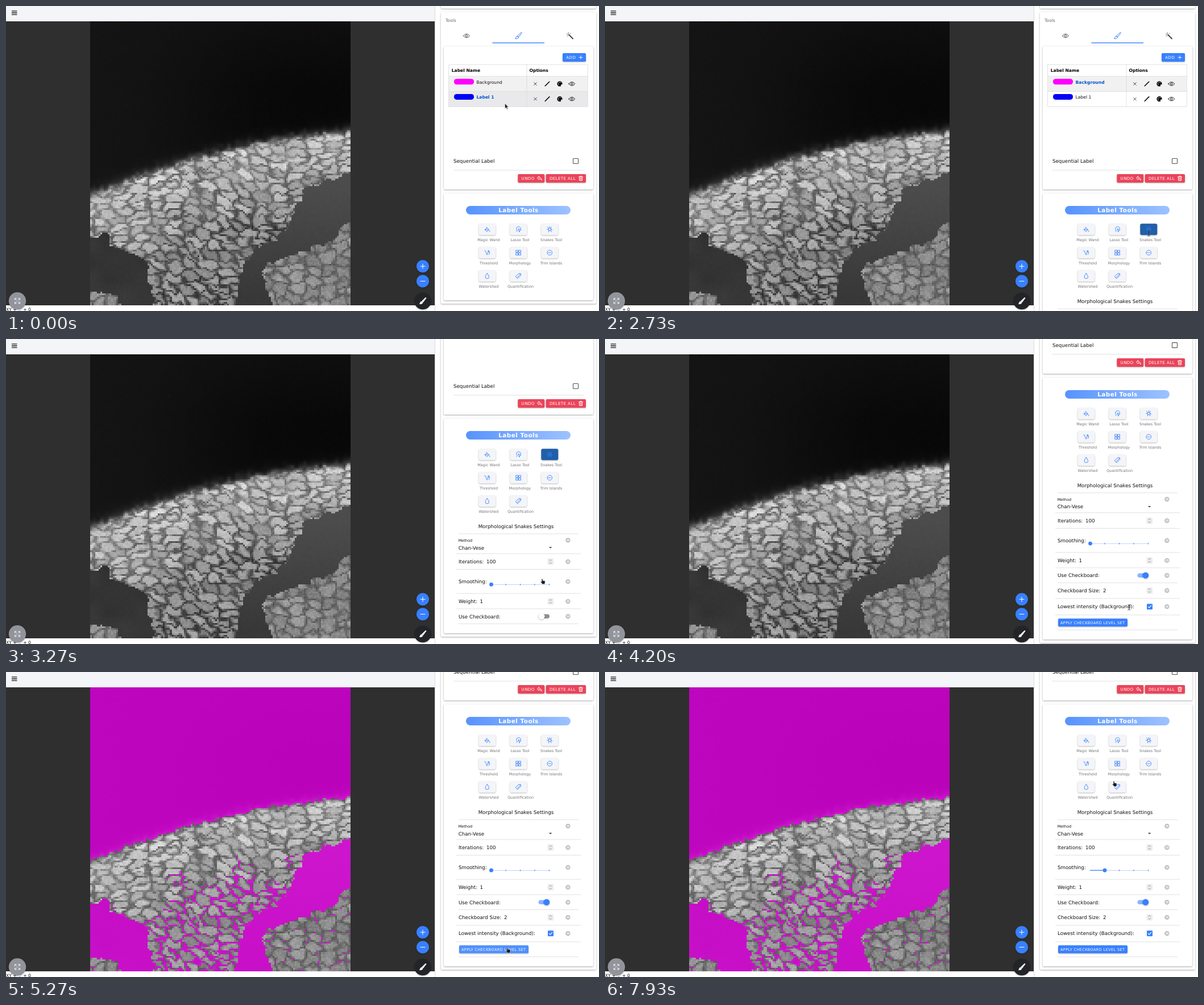
Animation of 1043 by 537 pixels, one loop 8000 ms. Source, as an HTML page with a canvas:

```html
<!DOCTYPE html>
<html lang="en">
<head>
<meta charset="utf-8">
<title>Label tools</title>
<style>
  html, body { margin: 0; width: 100%; height: 100%; overflow: hidden; background: #fff; }
  canvas { position: absolute; left: 147.5px; top: 27px; width: 458.5px; height: 500px; image-rendering: pixelated; }
  svg { position: absolute; left: 0; top: 0; }
  text { font-family: "DejaVu Sans", sans-serif; text-rendering: geometricPrecision; white-space: pre; }
  .card { filter: drop-shadow(0 1px 1.5px #0005); }
  .lift { filter: drop-shadow(0 1px 1px #0004); }
  .line { fill: none; stroke-linecap: round; stroke-linejoin: round; }
</style>
</head>
<body>
<svg id="back" width="1043" height="537"></svg>
<canvas id="scan" width="150" height="164"></canvas>
<canvas id="masked" width="150" height="164"></canvas>
<svg id="front" width="1043" height="537">
  <defs>
    <linearGradient id="pill"><stop stop-color="#5793fd"/><stop offset="1" stop-color="#9dc2ff"/></linearGradient>
    <clipPath id="side"><rect x="755" width="288" height="537"/></clipPath>
  </defs>
  <g id="viewer"></g>
  <g clip-path="url(#side)"><g id="panel"></g></g>
  <g id="cursor"></g>
</svg>
<script>
const $ = id => document.getElementById(id);
const BLUE = '#3880ff', RED = '#eb445a';
const clamp = (v, a = 0, b = 1) => Math.min(b, Math.max(a, v));
const mix = (a, b, k) => a + (b - a) * k;
const smooth = k => k * k * (3 - 2 * k);

// ---------- scan image ----------
const hash = (x, y) => {
  const h = Math.sin(x * 127.1 + y * 311.7) * 43758.5453;
  return h - Math.floor(h);
};
function noise(x, y) {
  const i = Math.floor(x), j = Math.floor(y), u = smooth(x - i), v = smooth(y - j);
  return mix(mix(hash(i, j), hash(i + 1, j), u), mix(hash(i, j + 1), hash(i + 1, j + 1), u), v);
}
// Distance to the nearest cell border and a random tone for that cell.
function cells(x, y) {
  let near = 9, next = 9, tone = 0;
  const ci = Math.floor(x), cj = Math.floor(y);
  for (let i = ci - 1; i <= ci + 1; i++) for (let j = cj - 1; j <= cj + 1; j++) {
    const d = Math.hypot(i + .1 + .8 * hash(i, j) - x, j + .1 + .8 * hash(j + 57, i) - y);
    if (d < near) { next = near; near = d; tone = hash(i + 91, j + 13); }
    else if (d < next) next = d;
  }
  return [smooth(clamp((next - near) * 2.6)), tone];
}
const region = d => new Path2D(d);
const lumen = region('M620 290L606 295L570 306L526 321L514 348L500 382L488 402L458 422L436 432L412 470L402 540L472 540L462 505L448 470L462 452L505 438L548 424L575 412L590 388L620 370Z');
const cavity = region('M140 408L176 402L184 428L216 432L242 445L252 475L256 505L262 540L212 540L192 510L168 500L140 506Z');
const lump = region('M450 468L462 452L505 438L548 424L575 412L590 388L620 370L620 540L472 540L462 505ZM140 506L168 500L192 510L212 540L140 540Z');
const tester = $('scan').getContext('2d');

function brightness(x, y) {
  const u = (x - 147) / 459, grain = hash(x, y) - .5;
  const depth = y - (335 - 195 * u + 82 * u * u) + (noise(x / 7, y / 7) - .5) * 9;
  if (depth < 0) {
    const night = 20 - 12 * smooth(clamp(u * 1.2)) * clamp((y + 60) / 200);
    return night + 88 * Math.exp(depth / 6) + grain * 1.5;
  }
  const wx = x + (noise(x / 9, y / 9) - .5) * 10, wy = y + (noise(x / 9 + 40, y / 9) - .5) * 10;
  const within = path => tester.isPointInPath(path, wx, wy);
  if (within(lumen)) return mix(76, 56, clamp((y - 320) / 190)) + grain * 3;
  if (within(cavity)) return 58 - 10 * noise(x / 30, y / 30) + grain * 3;
  if (within(lump)) {
    const [body, tone] = cells(wx / 25, wy / 19);
    return mix(92, 125 + tone * 35, body) + grain * 22;
  }
  const t = clamp(depth / 170);
  const bent = wy - 13 * Math.sin(x / 48 + y / 75) - .08 * x;
  const [body, tone] = cells(wx / 31, bent / 14);
  const gap = 128 - 64 * t + (noise(x / 38, y / 30) - .5) * 46;
  const light = 205 - 48 * t - 22 * t * u + (tone - .5) * 42;
  return mix(gap, light, body) * mix(.62, 1, clamp(depth / 7)) + grain * 20;
}
function paint(canvas, masked) {
  const ctx = canvas.getContext('2d'), { width: w, height: h } = canvas;
  const img = ctx.createImageData(w, h);
  for (let p = 0; p < w * h; p++) {
    const v = brightness(147.5 + (p % w + .5) * 458.5 / w, 27 + (Math.floor(p / w) + .5) * 500 / h);
    const rgb = masked && v < 87 ? [184 + .28 * v, .28 * v, 184 + .28 * v] : [v, v, v];
    img.data.set([...rgb, 255], p * 4);
  }
  ctx.putImageData(img, 0, 0);
}
paint($('scan'), false);
paint($('masked'), true);

// ---------- drawing helpers ----------
const rect = (x, y, w, h, fill, r = 0, more = '') =>
  `<rect x="${x}" y="${y}" width="${w}" height="${h}" rx="${r}" fill="${fill}" ${more}/>`;
const circle = (x, y, r, fill, more = '') => `<circle cx="${x}" cy="${y}" r="${r}" fill="${fill}" ${more}/>`;
// y is the middle of the capitals
const text = (x, y, s, size = 8.69, fill = '#111', more = '') =>
  `<text x="${x}" y="${y + size * .36}" font-size="${size}" fill="${fill}" ${more}>${s}</text>`;
const stroke = (x, y, d, color = '#222', w = .9) =>
  `<path class="line" transform="translate(${x} ${y})" d="${d}" stroke="${color}" stroke-width="${w}"/>`;
const solid = (x, y, d, color, more = '') => `<path transform="translate(${x} ${y})" d="${d}" fill="${color}" ${more}/>`;
const rule = (x1, x2, y) => rect(x1, y - .4, x2 - x1, .8, '#d9d9d9');
const BOLD = 'font-weight="700"', MID = 'text-anchor="middle"', SPACED = 'letter-spacing=".06em"';

const ring = r => `M${-r} 0a${r} ${r} 0 1 0 ${2 * r} 0a${r} ${r} 0 1 0 ${-2 * r} 0`;
const EYE = 'M-5.5 0Q0-6.8 5.5 0Q0 6.8-5.5 0Z' + ring(1.8);
const BRUSH = 'M5.6-6L6-5.2L.6 2L-1.6 .2L4.8-6ZM-2.2 .8L0 2.7Q-.6 5.6-5.8 5Q-4.4 4.2-4.3 2.6Q-3.9 .8-2.2 .8Z';
const TRASH = 'M-3.4-2.6H3.4M-1.3-2.6V-4H1.3V-2.6M-2.8-2.6L-2.3 4H2.3L2.8-2.6M-.9-.8V2.4M.9-.8V2.4';
const TOOLS = [
  ['Magic Wand', 'M-1.5-4L3.2 .7L-.6 4L-4.2 .4L0-2.6M-4 .6H3M4.4 2.4V4'],
  ['Lasso Tool', 'M-3.5 3.8Q-1.5 3-2.4 1.4A4 3.6 0 1 1 4.3-.6M0-1L4.6 1.2L2.4 2L1.6 4.4Z'],
  ['Snakes Tool', 'M-1.8-1.6Q0-3 1.8-1.6Q3 0 1.8 1.6Q0 3-1.8 1.6Q-3 0-1.8-1.6M-3.5-4.3L-2-1.8M3-4.2L1.8-1.6M4.7 1L2-.2M2.8 4.3L1.6 1.8M-2 4.6L-1.4 2M-4.8 0H-2.4M0-4.8V-3'],
  ['Threshold', 'M-4.6-3.4Q-3-4.5-2.3-1.8L-.9 3.4Q-.4 4.6 .2 3.4L2.4-2.8' + 'M2.4-3.8a1.2 1.2 0 1 0 .1 0M4.3-1.6Q4.8 1 3.2 3.2'],
  ['Morphology', 'M-4.2-4.2H-.7V-.7H-4.2ZM.7-4.2H4.2V-.7H.7ZM-4.2 .7H-.7V4.2H-4.2ZM.7 .7H4.2V4.2H.7Z'],
  ['Trim Islands', ring(4.3) + 'M-2 0H2'],
  ['Watershed', 'M0-4.6Q3.3-.6 3.3 1.6A3.3 3 0 0 1-3.3 1.6Q-3.3-.6 0-4.6Z'],
  ['Quantification', 'M-4.8 .6L.8-4.4L4-4.2L4.4-1L-1.4 4.4ZM-2.4 2.9L3-2.4M2-3.2h.1']
];

$('back').innerHTML = rect(0, 0, 754, 27, '#f4f5f8') + rect(0, 27, 754, 500, '#2f2f2f') + rect(754, 0, .8, 537, '#d2d2d2');

function viewer(hover) {
  const fab = (y, d) => circle(733, y, 11, BLUE, 'class="lift"') + stroke(733, y, d, '#fff', 1);
  return (hover ? circle(14.5, 12, 13, '#e3e4e7') : '') +
    stroke(14.7, 12, 'M-4.3-3.2H4.3M-4.3 0H4.3M-4.3 3.2H4.3', '#111', 1.3) +
    text(0, 534, "XY + ':' + 0", 7.6) +
    fab(458.3, 'M-4 0H4M0-4V4') + fab(484.5, 'M-4 0H4') +
    circle(733, 519.5, 14.8, '#222428', 'class="lift"') + solid(733, 519.5, BRUSH, '#fff', 'stroke="#fff" stroke-width=".8"') +
    circle(20, 519.3, 15.2, '#92949c', 'class="lift"') +
    stroke(20, 519.3, 'M-4.5-1.8V-4.5H-1.8M1.8-4.5H4.5V-1.8M4.5 1.8V4.5H1.8M-1.8 4.5H-4.5V1.8M-4.2-4.2L-1.3-1.3M4.2-4.2L1.3-1.3M4.2 4.2L1.3 1.3M-4.2 4.2L-1.3 1.3', '#fff');
}

function labelTable(s) {
  const shift = s.selected ? 0 : 1;
  const row = (i, name, color) => {
    const y = 137 + i * 26.7, on = s.selected === i;
    const bg = s.hoverRow === i ? '#e9e9eb' : i ? '#fff' : '#f1f1f1';
    return rect(779, y - 13, 244, 26.5, bg) + rect(788, y - 8.8, 35, 10, color, 4.5) +
      text(827.5, y - 3.2, name, 7.6, on ? '#0054d1' : '#111', on ? BOLD : '') +
      stroke(931 + shift, y, 'M-2.4-2.4L2.4 2.4M2.4-2.4L-2.4 2.4', '#222', .8) +
      stroke(952 + shift, y, 'M-3.8 3.8L3.8-3.8', '#000', 1.5) +
      circle(974 + shift, y, 4.6, '#000') +
      [[-2.4, -.8], [-.8, -2.6], [1.6, -2.4], [-2, 1.6]].map(([a, b]) => circle(974 + shift + a, y + b, .75, bg)).join('') +
      circle(977.4 + shift, y + 2.6, 1.7, bg) +
      stroke(995.3 + shift, y, EYE, '#111', .9);
  };
  return row(0, 'Background', '#ff00ff') + row(1, 'Label 1', '#0000f5') +
    text(783.7, 113.4, 'Label Name', 7.6, '#000', BOLD) + text(920.5 + shift, 113.4, 'Options', 7.6, '#000', BOLD) +
    stroke(0, 0, `M779 103H1023.3V177.3H779ZM779 123.7H1023M779 150.4H1023M${916 + shift} 103V177`, '#dadada', .8);
}

function settings(s) {
  const info = y => stroke(988.4, y, ring(3.4) + 'M0-.4V1.7M0-1.6V-1.5', '#555', .7);
  const field = (y, label, x = 0, value = '') => text(796, y, label) + info(y) + (value ? text(x, y, value) +
    rect(952.5, y - 5.5, 10.5, 11, '#ececec', 1) + stroke(957.7, y, 'M-1.8-1.8L0-3.5L1.8-1.8M-1.8 1.8L0 3.5L1.8 1.8', '#777', .8) : '');
  const knob = s.smoothing ? 879 : 853.5;
  let out = text(897, 519.7, 'Morphological Snakes Settings', 8.69, '#111', MID) + rule(796, 1007, 533) +
    text(795.7, 545, 'Method', 6.52) + info(544.3) + text(795.7, 557.4, 'Chan-Vese') + solid(957.6, 557.3, 'M-2.8-1.3H2.8L0 1.5Z', '#555') +
    rule(792, 1011, 568) + field(582, 'Iterations:', 845, '100') + rule(792, 1011, 595.4) +
    field(617, 'Smoothing:') + rect(853, 621.9, 103, .8, '#a9c8ff') + rect(853, 621.6, knob - 853, 1.2, BLUE) +
    [879, 904.5, 930, 955.5].map(x => rect(x - .5, 621, 1, 2.6, BLUE)).join('') + circle(knob, 622.2, 3.4, BLUE) +
    rule(792, 1011, 638) + field(652, 'Weight:', 833.5, '1') + rule(792, 1011, 665) + field(678.4, 'Use Checkboard:') +
    rect(936.5, 674.5, 19.5, 7.6, s.checker ? '#8ab4ff' : '#8f8f8f', 3.8) +
    circle(s.checker ? 950.8 : 942, 678.3, 5.5, s.checker ? BLUE : '#fff', 'class="lift"') + rule(796, 1007, 691.3);
  if (s.checker) out += field(705, 'Checkboard Size:', 876, '2') + rule(792, 1011, 719) +
    field(733.3, 'Lowest intensity (Background):') + rect(953, 728.3, 10, 10, BLUE, 1.2) + stroke(958, 733.3, 'M-2.6 .2L-.8 2L2.8-2', '#fff', 1.1) +
    rule(792, 1011, 748) + rect(797, 754.3, 122, 14, s.apply ? '#4f90ff' : BLUE, 2, 'class="lift"') +
    text(801, 761.3, 'APPLY CHECKBOARD LEVEL SET', 6.52, '#fff', SPACED) + rule(796, 1007, 774.3);
  return out;
}

function panel(s) {
  const extra = s.checker ? 273 : s.snakes ? 190 : 0;
  const card = (x, y, w, bottom) => rect(x, y, w, bottom - y, '#fff', 2, 'class="card"');
  const button = (x, y, w, label, fill, icon) => rect(x, y, w, 15, fill, 2, 'class="lift"') +
    text(x + 6.3, y + 7.5, label, 7.06, '#fff', SPACED) + stroke(x + w - 9, y + 7.5, icon, '#fff', .9);
  const tool = ([name, icon], i) => {
    const x = 846.3 + i % 3 * 55, y = 393.3 + Math.floor(i / 3) * 41;
    const focus = i === 2 && s.focus;
    return rect(x - 15, y - 10, 30, 20, focus ? '#215fa8' : '#f4f5f8', 3, 'class="lift"') + stroke(x, y, icon, BLUE, .9) +
      text(x + (i === 7 ? 3.8 : 2.7), y + 18, name, 6.52, '#737373', MID);
  };
  return card(765, -60, 273, 4.6) + card(765, 11, 273, 524 + extra) + text(773, 25, 'Tools', 7.6, '#666') +
    stroke(810, 52.5, EYE, '#555', 1) + solid(901.3, 52.5, BRUSH, 'none', `stroke="${BLUE}" stroke-width="1"`) +
    stroke(992, 52.5, 'M-2-2L5 5', '#444', 2) + stroke(992, 52.5, 'M-2.4-5.6V-4.4M-5.6-2.2H-4.5M-4.8-4.8L-4-4M1.2-4.6L.4-3.8M-4.6 1L-3.8 .2', '#444', .9) +
    rect(855.5, 64.2, 91.5, 1.4, BLUE) + card(770, 71, 263, 323) +
    button(979, 83, 41, 'ADD', BLUE, 'M-3 0H3M0-3V3') + labelTable(s) +
    text(787, 273.2, 'Sequential Label') + rect(997.5, 268.5, 9, 9, '#fff', 1, 'stroke="#555" stroke-width="1.1"') + rule(787, 1016, 289) +
    button(900.3, 296, 47, 'UNDO', RED, 'M-1-3.5L-4-.6L-1 2.2V.6Q2.6 .4 4 3.4Q3.4-1.8-1-2Z') + button(949.6, 296, 70.4, 'DELETE ALL', RED, TRASH) +
    card(770, 330, 263, 518 + extra) + rect(809, 352, 184, 15, 'url(#pill)', 7.5) +
    text(901.5, 359.6, 'Label Tools', 10.4, '#fff', `${BOLD} ${MID} letter-spacing=".5"`) +
    TOOLS.map(tool).join('') + (s.snakes ? settings(s) : '');
}

// ---------- cursor ----------
const CURSORS = {
  arrow: solid(0, 0, 'M0 0V9L2.1 7.2L3.6 10.5L5 9.9L3.6 6.7H6.3Z', '#222', 'stroke="#fff" stroke-width=".5"'),
  hand: solid(0, 0, 'M-.9 .8Q0-.6 .9 .8V3.2L4.6 3.9Q5.4 4.1 5.2 5.2L4.5 9.4H.3L-2.7 5.7Q-2.6 4.4-.9 5.6Z', '#1a1a1a', 'stroke="#eee" stroke-width=".5"'),
  grab: solid(0, 0, 'M-2 .6Q-1-.6 0 .2Q1.2-.8 2 .5Q3.4 0 3.6 1.6V6.4L2.8 8.8H-2.2L-4 5.4V3.4L-2.4 3.6Z', '#1a1a1a', 'stroke="#eee" stroke-width=".4"'),
  beam: stroke(0, 0, 'M-2-4.6Q0-4.6 0-3.6Q0-4.6 2-4.6M0-3.6V3.6M-2 4.6Q0 4.6 0 3.6Q0 4.6 2 4.6', '#333', .9)
};
// [start, end, x, y, shape while moving and after]
const MOVES = [
  [0, 0, 877.5, 171.5, 'arrow'], [130, 470, 870, 129, 'arrow'], [930, 1560, 22, 9, 'hand'],
  [2200, 2530, 956.5, 400, 'hand'], [2680, 2950, 956.5, 405, 'beam'], [3070, 3270, 943, 422, 'grab'],
  [3270, 3560, 946, 485, 'hand'], [4000, 4400, 898, 460, 'beam'], [4400, 4780, 882, 485, 'hand'],
  [6270, 6830, 879, 346, 'hand'], [7200, 7530, 886, 250, 'hand'], [7670, 7930, 895, 192, 'hand']
];
const SCROLLS = [[2730, 2960, 98.8], [3070, 3240, 190], [4000, 4260, 273]];
const along = (t, a, b) => b > a ? smooth(clamp((t - a) / (b - a))) : 1;

function setMarkup(id, markup) {
  const node = $(id);
  if (node.markup !== markup) node.innerHTML = node.markup = markup;
}

function draw(t) {
  let x = 0, y = 0, shape = 'arrow', scroll = 0;
  for (const [a, b, nx, ny, kind] of MOVES) if (t >= a) {
    const k = along(t, a, b);
    x = mix(x, nx, k);
    y = mix(y, ny, k);
    shape = kind;
  }
  for (const [a, b, to] of SCROLLS) if (t >= a) scroll = mix(scroll, to, along(t, a, b));

  const overTable = t < 2200 && x > 779;
  const state = {
    selected: t < 730 ? 1 : 0,
    hoverRow: !overTable || y < 124 ? -1 : y < 150 ? 0 : 1,
    snakes: t >= 2600,
    focus: t >= 2600 && t < 3800,
    checker: t >= 3800,
    smoothing: t >= 6870,
    apply: t > 4650 && t < 6400
  };
  setMarkup('viewer', viewer(Math.hypot(x - 14.5, y - 12) < 14));
  setMarkup('panel', panel(state));
  setMarkup('cursor', CURSORS[shape]);
  $('panel').setAttribute('transform', `translate(0 ${-scroll})`);
  $('cursor').setAttribute('transform', `translate(${x} ${y})`);
  $('masked').style.visibility = t >= 5200 ? 'visible' : 'hidden';
}

const start = performance.now();
function tick() {
  draw((performance.now() - start) % 8000);
  requestAnimationFrame(tick);
}
tick();
</script>
</body>
</html>
```
